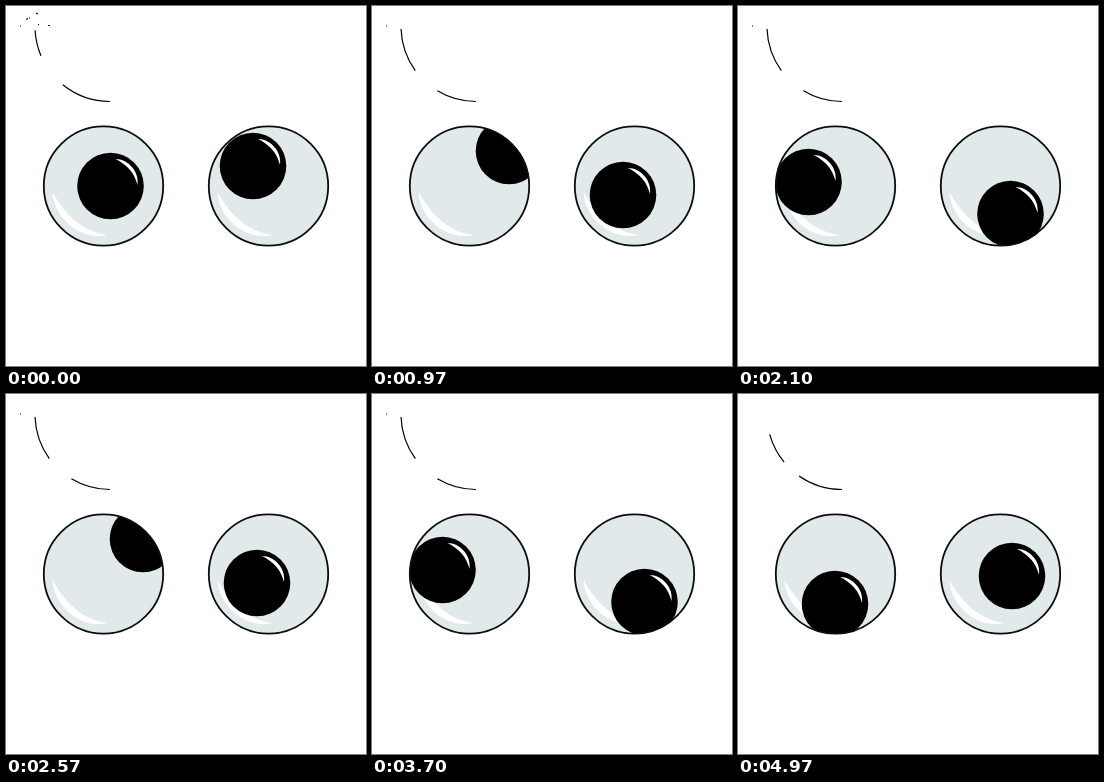
These frames come from a looping animation (360x360 px, 5070 ms). An HTML page:

```html
<!DOCTYPE html>
<html lang="en">
<head>
<meta charset="utf-8">
<title>Googly eyes</title>
<style>
html, body { margin: 0; height: 100%; overflow: hidden; background: #fff; }
svg { display: block; width: 100vw; height: 100vh; }
.line { fill: none; stroke: #000; stroke-width: 1.2; }
</style>
</head>
<body>
<svg viewBox="0 0 360 360">
  <defs>
    <clipPath id="rim"><circle r="60"/></clipPath>
    <g id="ball">
      <circle r="60" fill="#e1e9eb"/>
      <path fill="#fff" d="M-51 6C-50 30-26 55 4 49C-18 46-37 32-51 6Z"/>
    </g>
    <g id="pupil">
      <circle r="33.3"/>
      <path fill="#fff" d="M5-27C18-27 29-14 27-1C24-13 17-21 5-27Z"/>
    </g>
    <circle id="outline" r="59.7" fill="none" stroke="#0b0d0e" stroke-width="1.8"/>
  </defs>
  <path id="arc" class="line" pathLength="90" d="M104 95.5A75 75 0 0 1 29 20.5"/>
  <path id="head" class="line"/>
  <g transform="translate(97.5 180)">
    <use href="#ball"/>
    <g clip-path="url(#rim)"><use class="pupil" href="#pupil"/></g>
    <use href="#outline"/>
  </g>
  <g transform="translate(262.5 180)">
    <use href="#ball"/>
    <g clip-path="url(#rim)"><use class="pupil" href="#pupil"/></g>
    <use href="#outline"/>
  </g>
</svg>
<script>
const LOOP = 5070, CYCLE = 20, LAST_STEP = 62;
const pupils = document.querySelectorAll('.pupil');
const arc = document.getElementById('arc');
const head = document.getElementById('head');

// Pupil offsets from the eye centre, one point every two steps.
const paths = [
  [[7, 0], [-.5, 30], [-22, 22], [-27, -4], [-12, -26], [14, -34], [39.5, -35], [32, -4], [14, 18], [2, 8]],
  [[-15.5, -20], [11.5, 2], [24, 18], [10, 28], [-8, 26], [-20, 18], [-11.5, 9], [4, -2], [2, -20], [-10, -26]]
];

const HEAD = 'M14 20l2-2M19 14L29 6.5L37 13M40 16l4 4M29 6V11M29 14V20';
const SPECKS = 'M14 20h1M20 13.5l2-1M23 12h1M30 7l2 1M42 19.5h2M32 18.5h1';
const SPECK = 'M14 20h1';

// Closed Catmull-Rom curve through the points.
function along(points, u) {
  const i = Math.floor(u), f = u - i, n = points.length;
  const [a, b, c, d] = [-1, 0, 1, 2].map(o => points[(i + o + n) % n]);
  return [0, 1].map(j => b[j] + f / 2 * (c[j] - a[j] +
    f * (2 * a[j] - 5 * b[j] + 4 * c[j] - d[j] + f * (3 * (b[j] - c[j]) + d[j] - a[j]))));
}

function arrowAt(step, phase) {
  if (step === 0) return ['39 28 20 99', SPECKS];
  if (phase % 5 === 0) return ['39 20 1 7 21 99', HEAD];
  if (phase < 5) return ['35 15.5 24 99', ''];
  return ['31 23 34 99', SPECK];
}

function draw(now) {
  // 80 ms steps shown on a 30 Hz clock.
  const tick = Math.floor((now % LOOP + 4) * 0.03);
  const step = Math.min(LAST_STEP, Math.floor(tick / 2.4 + 1e-6));
  const phase = step % CYCLE;
  pupils.forEach((p, i) => p.setAttribute('transform', `translate(${along(paths[i], phase / 2)})`));
  const [dashes, tip] = arrowAt(step, phase);
  arc.setAttribute('stroke-dasharray', dashes);
  head.setAttribute('d', tip);
}

const start = performance.now();
function frame() {
  draw(performance.now() - start);
  requestAnimationFrame(frame);
}
frame();
</script>
</body>
</html>
```
